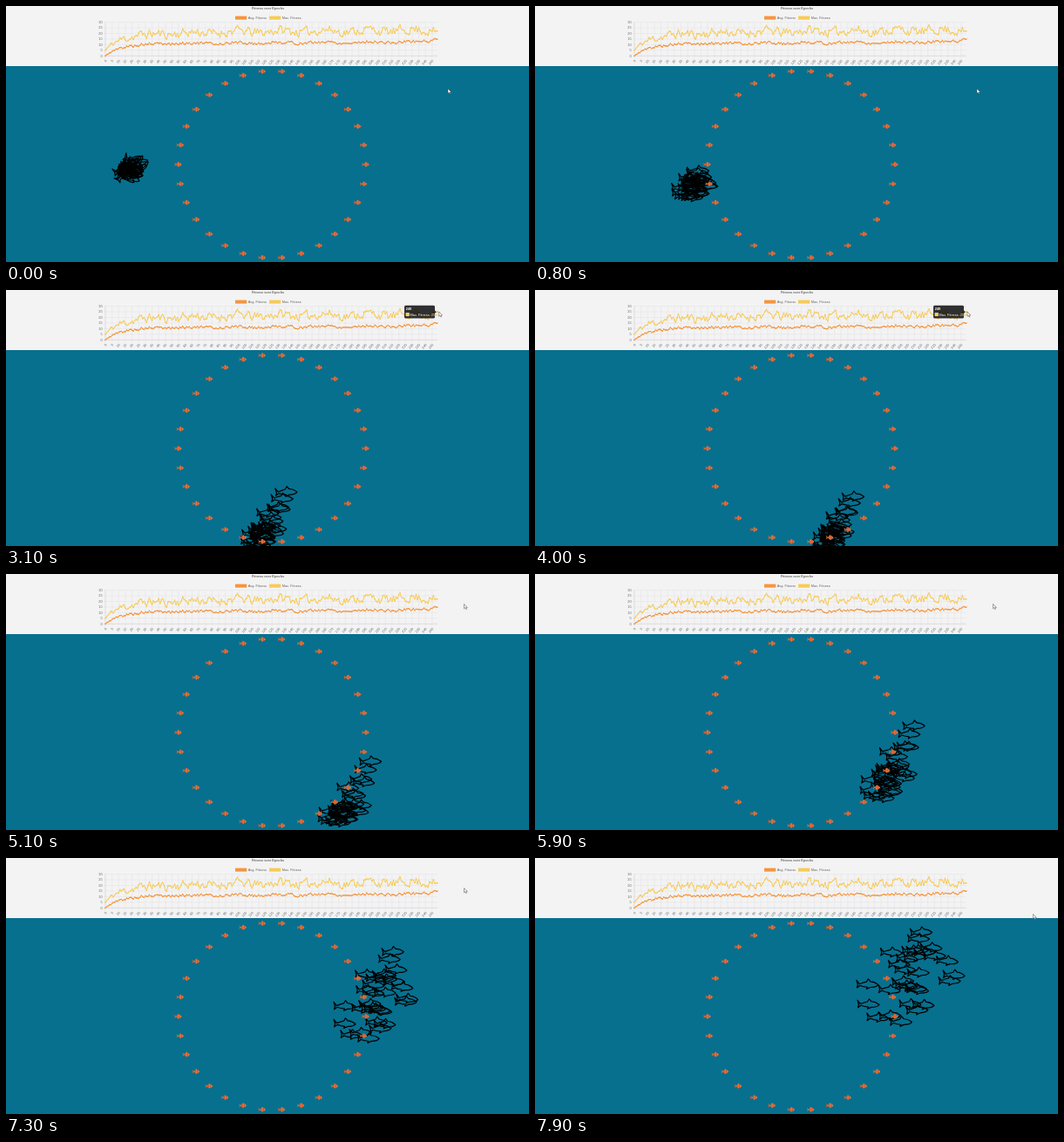
An HTML page for the animation above (8000 ms loop, 600 by 294 pixels).

```html
<!DOCTYPE html>
<html lang="en">
<head>
<meta charset="utf-8">
<title>Fitness over Epochs</title>
<style>
  html, body { margin: 0; width: 100%; height: 100%; overflow: hidden; background: #07708f; }
  svg { display: block; width: 100vw; height: 100vh; }
  text { font-family: "Liberation Sans", Arial, sans-serif; font-size: 3.9px; fill: #666; }
  .title { font-size: 3.8px; font-weight: bold; text-anchor: middle; }
  .tick { text-anchor: end; }
  .grid { stroke: #dedee0; stroke-width: .4; }
  .axis { stroke: #c4c4c6; stroke-width: .5; }
  .line { fill: none; stroke-width: 1; stroke-linejoin: round; }
  .tip text { fill: #fff; }
</style>
</head>
<body>
<svg viewBox="0 0 600 294" preserveAspectRatio="none">
  <defs>
    <path id="shark" fill="none" stroke="#000" stroke-width="1.2" stroke-linejoin="round"
      d="M12.5 .8C9-2.2 6-3 3.5-3L1-6L-1-2.8C-4-2.2-7-1-9-.3L-12.5-4.5L-11 .4L-12 4L-8.5 1.5C-6 2.5-3 3.2 0 3.4L-1 5.5L3.5 3.6C7 3.6 11 3 12.5 .8Z"/>
    <g id="fish">
      <path d="M-1.8 0L-4.3-2.2L-3.7 0L-4.3 2.2ZM-1.3-1.8L.3-3.2L1.8-1.8ZM-.8 1.8L.2 3L1.4 1.8Z" fill="#d9652f"/>
      <path d="M4.2 0Q.8-4.4-2.6 0Q.8 4.4 4.2 0Z" fill="#f0743a"/>
      <path d="M-.8-1.5V1.5M1.6-1.9V1.9" stroke="#8a4a36" stroke-width=".6"/>
    </g>
  </defs>
  <rect width="600" height="294" fill="#07708f"/>
  <rect width="600" height="69" fill="#f3f3f4"/>
  <g id="chart">
    <text class="title" x="300.5" y="4.3">Fitness over Epochs</text>
    <rect x="263" y="11.6" width="13.2" height="4" fill="#f7953a"/>
    <text x="277.7" y="15">Avg. Fitness</text>
    <rect x="302" y="11.6" width="13.2" height="4" fill="#f8cb55"/>
    <text x="316.7" y="15">Max. Fitness</text>
  </g>
  <g id="sharks"></g>
  <g id="school"></g>
  <g id="tip" class="tip">
    <circle cx="494.9" cy="25.1" r="1.4" fill="#f8cb55"/>
    <path d="M458.5 17.8H490.5Q492 17.8 492 19.3V23.4L493.8 25.2L492 27V31Q492 32.5 490.5 32.5H458.5Q457 32.5 457 31V19.3Q457 17.8 458.5 17.8Z" fill="#000" fill-opacity=".8"/>
    <text x="458.8" y="23" font-weight="bold">249</text>
    <rect x="458.9" y="26.3" width="3.6" height="3.6" fill="#f8cb55" stroke="#fff" stroke-width=".4"/>
    <text x="463.6" y="29.6">Max. Fitness: 25</text>
  </g>
  <path id="cursor" d="M0 0V5.2L1.3 4.2L2.2 6.1L3 5.7L2.2 3.9H3.8Z" fill="#fff" stroke="#444" stroke-width=".5"/>
</svg>
<script>
const LOOP = 8000, STEP = 100, COUNT = 30, EPOCHS = 250;
const $ = id => document.getElementById(id);

function add(parent, tag, attrs, text) {
  const el = document.createElementNS("http://www.w3.org/2000/svg", tag);
  for (const k in attrs) el.setAttribute(k, attrs[k]);
  if (text !== undefined) el.textContent = text;
  return parent.appendChild(el);
}

function seeded(a) {
  return () => {
    a = a + 0x6D2B79F5 | 0;
    let r = Math.imul(a ^ a >>> 15, 1 | a);
    r = r + Math.imul(r ^ r >>> 7, 61 | r) ^ r;
    return ((r ^ r >>> 14) >>> 0) / 4294967296;
  };
}

// Rows are [time, ...values].
function segment(rows, t) {
  let i = 0;
  while (i < rows.length - 2 && t > rows[i + 1][0]) i++;
  const span = rows[i + 1][0] - rows[i][0];
  return { i, span, u: Math.min(1, (t - rows[i][0]) / span) };
}

function linear(rows, t) {
  const { i, u } = segment(rows, t);
  return rows[i].slice(1).map((v, k) => v + (rows[i + 1][k + 1] - v) * u);
}

// Cubic Hermite with slopes taken from the neighbouring rows.
function smooth(rows, t) {
  const { i, u, span } = segment(rows, t);
  const slope = (j, k) => {
    const a = rows[Math.max(0, j - 1)], b = rows[Math.min(rows.length - 1, j + 1)];
    return (b[k] - a[k]) / (b[0] - a[0]) * span;
  };
  return rows[i].slice(1).map((p, n) => {
    const k = n + 1, q = rows[i + 1][k];
    return p + u * u * (3 - 2 * u) * (q - p)
      + u * (1 - u) * ((1 - u) * slope(i, k) - u * slope(i + 1, k));
  });
}

// ---- chart ----
const chart = $("chart");
const px = e => 114 + e * 1.53, py = v => 57.3 - v * 1.29;

for (let v = 0; v <= 30; v += 5) {
  add(chart, "path", { class: v ? "grid" : "axis", d: `M112 ${py(v)}H495` });
  add(chart, "text", { class: "tick", x: 110.6, y: py(v) + 1.4 }, v);
}
for (let e = 0; e < EPOCHS; e += 5) {
  add(chart, "path", { class: e ? "grid" : "axis", d: `M${px(e)} 18.6V59.5` });
  add(chart, "text", { class: "tick", transform: `translate(${px(e) + 1.8} 63) rotate(-50)` }, e);
}

const rise = (e, tau) => 1 - Math.exp(-e / tau);
const wave = e => Math.cos((e - 98) * 2 * Math.PI / 33) * rise(e, 60);

function plot(trend, noise, color, seed) {
  const rnd = seeded(seed);
  let d = "", drift = 0;
  for (let e = 0; e < EPOCHS; e++) {
    drift = drift * .4 + (rnd() - .5) * noise * rise(e, 6);
    const x = px(e).toFixed(2), y = py(trend(e) + drift).toFixed(2);
    d += (e ? "L" : "M") + x + " " + y;
    add(chart, "circle", { cx: x, cy: y, r: .8, fill: color });
  }
  add(chart, "path", { class: "line", stroke: color, d });
}

plot(e => 10.6 * rise(e, 11) + e / 130 + .6 * wave(e) + Math.max(0, e - 235) * .17, 2.4, "#f7953a", 5);
plot(e => 5 + 13 * rise(e, 10) + 5 * rise(e, 90) + 1.3 * wave(e), 7.5, "#f8cb55", 11);

// ---- ring of fish ----
for (let i = 0; i < 30; i++) {
  const a = i * Math.PI / 15;
  add($("school"), "use", {
    href: "#fish",
    transform: `translate(${305 + 107.5 * Math.cos(a)} ${182 + 107.5 * Math.sin(a)})`
  });
}

// ---- sharks: an elliptic swarm whose fastest members are drawn out towards a leader ----
const rand = seeded(42);
const sharks = Array.from({ length: COUNT }, (_, n) => {
  const lead = (n / (COUNT - 1)) ** 5;
  const r = (n * .754877 % 1) ** .65 * (1 - lead), a = n * 2.39996;
  return {
    el: add($("sharks"), "use", { href: "#shark" }),
    lead, dx: r * Math.cos(a), dy: r * Math.sin(a),
    spin: (rand() - .5) * 100,
    tilt: (rand() - .5) * 8
  };
});

// time, centre x, y, leader's offset x, y, radius x, y
const swarm = [
  [0, 143.5, 187, 0, 0, 10, 13],
  [800, 183, 209, 4, -20, 17, 16],
  [2200, 246, 270, 29, -51, 18, 15],
  [4000, 340, 285, 25, -48, 12, 18],
  [5100, 386, 276, 32, -61, 20, 14],
  [6600, 414, 203, 28, -67, 28, 42],
  [7900, 430, 147, 13, -62, 60, 64]
];

const cursorPath = [
  [0, 507, 95], [1000, 507, 95], [1800, 517, 41], [2200, 533, 43], [2400, 549, 38],
  [2700, 497, 25], [4000, 496, 25], [4300, 525.5, 34.5], [7300, 525.5, 34.5], [7900, 571.5, 64.5]
];

function draw(t) {
  const [cx, cy, lx, ly, rx, ry] = smooth(swarm, t);
  for (const s of sharks) {
    const x = cx + lx * s.lead + rx * s.dx, y = cy + ly * s.lead + ry * s.dy;
    const angle = s.tilt + s.spin * Math.max(0, 1 - t / 800);
    s.el.setAttribute("transform", `translate(${x.toFixed(2)} ${y.toFixed(2)}) rotate(${angle.toFixed(1)})`);
  }
  $("cursor").setAttribute("transform", `translate(${linear(cursorPath, t).join(" ")})`);
  $("tip").style.display = t >= 2800 && t < 4200 ? "" : "none";
}

const start = performance.now();
function tick() {
  const t = (performance.now() - start) % LOOP;
  draw(Math.floor(t / STEP) * STEP);
  requestAnimationFrame(tick);
}
tick();
</script>
</body>
</html>
```
